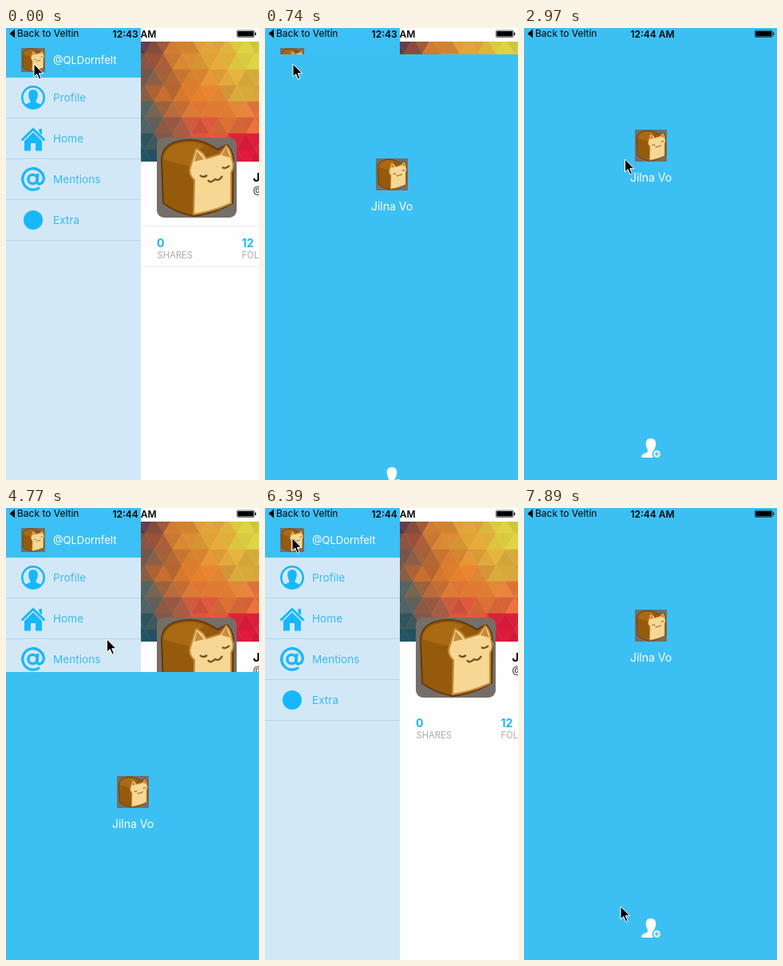
An HTML page that plays this animation: 317x565 px, repeating every 8000 ms.

```html
<!DOCTYPE html>
<html lang="en">
<head>
<meta charset="utf-8">
<title>Side menu and account sheet</title>
<style>
  html, body { margin: 0; width: 100%; height: 100%; overflow: hidden; background: #fff; }
  svg { display: block; width: 317px; height: 565px; }
  text { font-family: Inter, "Liberation Sans", sans-serif; }
  .row { font-size: 13.6px; fill: #35bcf3; }
  .icon { fill: #18b7fb; }
  .line { fill: none; stroke: #18b7fb; }
  .count { font-size: 14px; font-weight: 700; fill: #1fb6f4; }
  .label { font-size: 11.2px; fill: #a9abad; }
  .name { font-size: 14px; fill: #fff; text-anchor: middle; }
</style>
</head>
<body>
<svg viewBox="0 0 317 565">
  <defs>
    <symbol id="loaf" viewBox="0 0 100 100">
      <rect width="100" height="100" fill="#756e68"/>
      <path d="M6 29Q6 12 22 6Q40 0 56 5Q68 9 76 15L88 9Q94 14 96 26L95 82Q70 96 46 98Q24 94 8 82Z" fill="#965a0c" stroke="#64390a" stroke-width="2"/>
      <path d="M8 27Q9 13 26 8Q44 3 60 10L46 20L42 36Q24 32 8 27Z" fill="#a96a14"/>
      <path d="M46 96L47 53Q38 45 43 34L49 14Q57 17 62 26L79 21L87 10Q93 16 94 27Q98 36 93 44V82Q72 92 46 96Z" fill="#f6d793" stroke="#c58a38" stroke-width="2"/>
      <path d="M47 30L50 17L59 27ZM81 22L87 12L92 25Z" fill="#c98a3a"/>
      <path d="M54 47Q58 51 63 47M82 37Q86 40 91 35M64 53Q67 58 73 52Q78 55 82 48" fill="none" stroke="#7a4e1c" stroke-width="2.400"/>
    </symbol>
    <clipPath id="rounded"><rect x="189" y="137" width="100" height="100" rx="9"/></clipPath>
    <clipPath id="bannerArea"><rect x="169" y="17" width="148" height="150"/></clipPath>
  </defs>

  <rect width="317" height="565" fill="#fefefe"/>
  <g id="banner" clip-path="url(#bannerArea)"></g>
  <g clip-path="url(#rounded)"><use href="#loaf" x="189" y="137" width="100" height="100"/></g>
  <text x="309.5" y="192" font-size="15" font-weight="700">Jilna Vo</text>
  <text x="309.5" y="208" font-size="12" fill="#222">@QLDornfelt</text>
  <path id="rules" d="M169 247.5H317M169 298.5H317" stroke="#e6eaed"/>
  <text class="count" x="189" y="273.700">0</text>
  <text class="label" x="189.5" y="287.500">SHARES</text>
  <text class="count" x="295.5" y="273.700">12</text>
  <text class="label" x="295.5" y="287.500">FOLLOWING</text>

  <rect width="169" height="565" fill="#d3e8f6"/>
  <rect width="169" height="62" fill="#3cc0f5"/>
  <use href="#loaf" x="19" y="25" width="30" height="30"/>
  <text x="59" y="44.5" font-size="13" fill="#fff">@QLDornfelt</text>
  <path d="M0 112.5H169M0 163.5H169M0 214.5H169M0 265.5H169" stroke="#aed6ee"/>
  <text class="row" x="59" y="92">Profile</text>
  <text class="row" x="59" y="143">Home</text>
  <text class="row" x="59" y="194">Mentions</text>
  <text class="row" x="59" y="245">Extra</text>

  <circle class="line" cx="34" cy="87" r="13.7" stroke-width="2.6"/>
  <path class="icon" d="M34 77C29 77 27.500 81 28.500 86C29 89 30.500 90 30.500 92C30 94 26 94 24 96.500Q28 100.500 34 100.500Q40 100.500 44 96.500C42 94 38 94 37.500 92C37.500 90 39 89 39.500 86C40.500 81 39 77 34 77Z"/>
  <path class="line" d="M19.500 140.500L34 126.500L48.500 140.500" stroke-width="3"/>
  <path class="icon" d="M41.500 126H45V134L41.500 130.500ZM34 130.500L45 141V153.500H37V144H31V153.500H23V141Z"/>
  <circle class="line" cx="33.500" cy="189" r="5.600" stroke-width="3.400"/>
  <path class="line" d="M40 182L39 191Q39 195 42 195Q47 194 47.300 188A13.300 13.300 0 1 0 42 199.500" stroke-width="3.300"/>
  <circle class="icon" cx="34" cy="240" r="12"/>

  <g id="sheet">
    <rect y="-3" width="317" height="575" fill="#3cc0f4"/>
    <use href="#loaf" x="139" y="127" width="40" height="40"/>
    <text class="name" x="159" y="191.500">Jilna Vo</text>
    <path d="M159 513C153.500 513 152 517 153 522C153.500 525 155 526 155 529C154.500 532 147 531 147 537H170V531L163 529C163 526 164.500 525 165 522C166 517 164 513 159 513Z" fill="#fff"/>
    <circle cx="166.500" cy="532.500" r="5.200" fill="#fff" stroke="#3cc0f4" stroke-width="1.600"/>
    <path d="M163.500 532.500H169.500M166.500 529.500V535.500" stroke="#3cc0f4" stroke-width="1.500"/>
  </g>

  <path d="M4.500 7L11 1.500V12.500Z"/>
  <text x="14" y="11.300" font-size="12">Back to Veltin</text>
  <text id="clock" x="161" y="11.500" font-size="12" font-weight="600" text-anchor="middle"></text>
  <rect x="289.400" y="3" width="21.800" height="8.500" rx="1.500" fill="none" stroke="#000" stroke-width=".6"/>
  <rect x="290.300" y="3.900" width="20" height="6.700" rx=".7"/>
  <rect x="312" y="5.500" width="1.300" height="3.500" rx=".6"/>

  <path id="cursor" d="M0 0V16L3.700 12.600L6.500 19L9 18L6.300 11.700H11.500Z" stroke="#fff" stroke-width="1"/>
</svg>
<script>
const LOOP = 8000;
const byId = id => document.getElementById(id);

// Banner mosaic: each triangle blends nearby colour anchors.
const anchors = [
  [171, 20, '5a3a48'], [190, 34, 'a4563a'], [216, 32, 'd5822e'], [255, 36, 'dea236'],
  [305, 30, 'd6cc40'], [174, 64, '74584c'], [196, 82, 'c2682e'], [235, 82, 'e3802c'],
  [298, 80, 'dcb03c'], [270, 108, 'e07a34'], [312, 112, 'e0703a'], [172, 112, '4a6466'],
  [180, 158, '1f5566'], [208, 130, '9a5840'], [250, 130, 'd8503c'], [303, 150, 'e0183c']
].map(([x, y, hex]) => ({ x, y, rgb: [0, 2, 4].map(i => parseInt(hex.slice(i, i + 2), 16)) }));

let seed = 7;
const random = () => (seed = (seed * 16807) % 2147483647) / 2147483647;

function blend(x, y) {
  let total = 0;
  const sum = [0, 0, 0];
  for (const a of anchors) {
    const weight = 1 / ((x - a.x) ** 2 + (y - a.y) ** 2 + 120) ** 2;
    total += weight;
    a.rgb.forEach((v, i) => sum[i] += v * weight);
  }
  const shade = 0.94 + random() * 0.12;
  return `rgb(${sum.map(v => Math.min(255, Math.round(v / total * shade)))})`;
}

function drawBanner() {
  const half = 11.5, height = 20;
  let shapes = '';
  for (let row = 0; row < 9; row++) {
    for (let col = -1; col < 14; col++) {
      const x = 163 + col * half, top = 12 + row * height;
      const up = (row + col) & 1;
      const base = up ? top + height : top, tip = up ? top : top + height;
      const color = blend(x + half, top + height / 2);
      shapes += `<path d="M${x} ${base}H${x + 2 * half}L${x + half} ${tip}Z" fill="${color}" stroke="${color}" stroke-width=".5"/>`;
    }
  }
  byId('banner').innerHTML = shapes;
}

// The picture updates in even steps: start, end, number of steps.
const bursts = [
  [590, 1490, 7], [1790, 2230, 4], [2680, 2970, 3],
  [4770, 5210, 4], [5510, 6390, 7], [7290, 7890, 5]
];

function stepped(t) {
  let time = 0;
  for (const [start, end, steps] of bursts) {
    if (t < start) break;
    const gap = (end - start) / (steps - 1);
    time = Math.min(end, start + Math.floor((t - start) / gap + 1e-6) * gap);
  }
  return time;
}

const pointer = [
  [740, 35, 45], [1490, 167, 174], [1640, 167, 174], [2230, 152, 151],
  [2530, 152, 151], [2970, 126.5, 164], [5363, 126.5, 164], [5660, 120, 178],
  [6100, 22, 68], [6390, 34, 37.5], [7290, 34, 37.5], [7890, 121, 498]
];

function pointerAt(t) {
  const next = pointer.findIndex(p => p[0] >= t);
  if (next === 0) return pointer[0].slice(1);
  if (next < 0) return pointer[pointer.length - 1].slice(1);
  const [t0, x0, y0] = pointer[next - 1], [t1, x1, y1] = pointer[next];
  const u = (t - t0) / (t1 - t0), k = u * u * (3 - 2 * u);
  return [x0 + (x1 - x0) * k, y0 + (y1 - y0) * k];
}

const TRAVEL = 571;
const easeOut = u => 1 - (1 - Math.min(1, Math.max(0, u))) ** 4;

function sheetY(t) {
  const slide = start => easeOut((t - start) / 500);
  return Math.round(TRAVEL * (1 - slide(490) + slide(4716.5) - slide(7190)));
}

function render(now) {
  const t = stepped(now);
  const [x, y] = pointerAt(t);
  byId('sheet').setAttribute('transform', `translate(0 ${sheetY(t)})`);
  byId('cursor').setAttribute('transform', `translate(${x.toFixed(1)} ${y.toFixed(1)})`);
  byId('clock').textContent = t < 2680 ? '12:43 AM' : '12:44 AM';
  byId('rules').setAttribute('visibility', t < 4770 ? 'visible' : 'hidden');
}

drawBanner();
const began = performance.now();
function frame() {
  render((performance.now() - began) % LOOP);
  requestAnimationFrame(frame);
}
frame();
</script>
</body>
</html>
```
